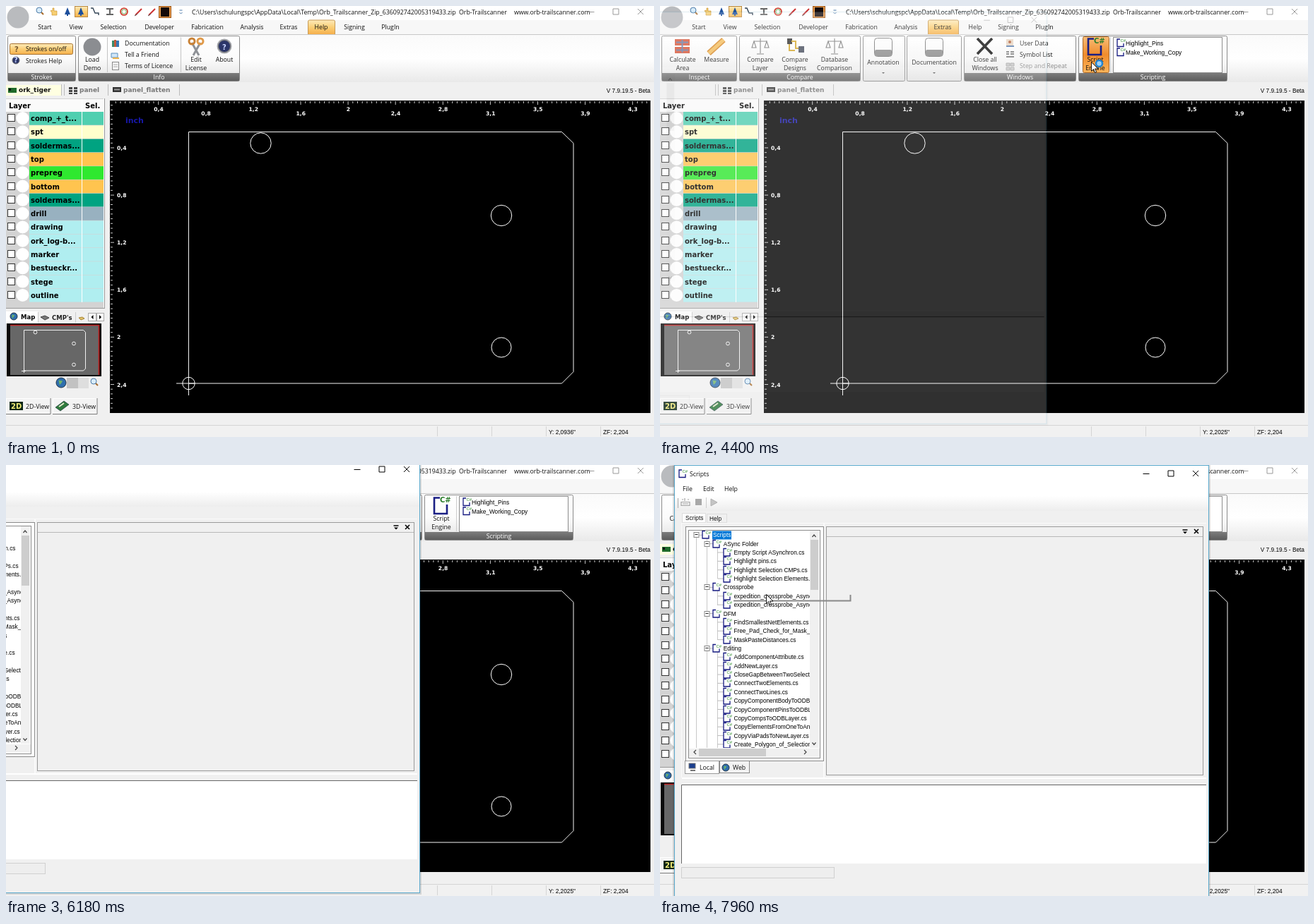
Animation, 917 px wide and 611 px high, one loop 8000 ms. Source, as an HTML page:

```html
<!DOCTYPE html>
<html lang="en">
<head>
<meta charset="utf-8">
<title>Opening the script engine</title>
<style>
html, body { margin: 0; width: 100%; height: 100%; overflow: hidden; background: #f0f0f0; }
svg { display: block; width: 917px; height: 611px; }
text { white-space: pre; }
.ui { font-family: "Open Sans", sans-serif; font-size: 8.75px; }
.sm { font-family: "Liberation Sans", Arial, sans-serif; font-size: 8.3px; }
.vb { font-family: "DejaVu Sans", Verdana, sans-serif; font-weight: bold; font-size: 10px; }
</style>
</head>
<body>
<svg id="stage" viewBox="0 0 917 611" xmlns="http://www.w3.org/2000/svg"></svg>
<script>
const rect = (x, y, w, h, fill, more = '') => `<rect x="${x}" y="${y}" width="${w}" height="${h}" fill="${fill}" ${more}/>`;
const frame = (x, y, w, h, fill, line, more = '') => rect(x + .5, y + .5, w - 1, h - 1, fill, `stroke="${line}" ${more}`);
const disc = (x, y, r, fill, more = '') => `<circle cx="${x}" cy="${y}" r="${r}" fill="${fill}" ${more}/>`;
const path = (d, line, w = 1, fill = 'none') => `<path d="${d}" stroke="${line}" stroke-width="${w}" fill="${fill}"/>`;
const text = (x, y, s, cls = 'ui', fill = '#111', more = '') => `<text x="${x}" y="${y}" class="${cls}" fill="${fill}" ${more}>${s}</text>`;
const mid = (x, y, s, cls, fill) => text(x, y, s, cls, fill, 'text-anchor="middle"');
const group = (id, body) => `<g id="${id}">${body}</g>`;
const ramp = (id, ...stops) => `<linearGradient id="${id}" x2="0" y2="1">` +
  stops.map((c, i) => `<stop offset="${i / (stops.length - 1)}" stop-color="${c}"/>`).join('') + '</linearGradient>';
const range = n => [...Array(n).keys()];

const defs = `<defs>
${ramp('bandFill', '#fafafa', '#ffffff', '#e9e9e9')}${ramp('panelFill', '#ffffff', '#fbfbfb', '#e2e2e2')}
${ramp('footFill', '#7c7c7c', '#5c5c5c')}${ramp('tabFill', '#fdeaba', '#fbcf77', '#f6b04c')}
${ramp('hoverFill', '#fff3cf', '#fbd27c')}${ramp('pressFill', '#f7bd78', '#f08c2c', '#fbb45a')}
${ramp('toolFill', '#ffffff', '#ededed')}
<clipPath id="treeClip"><rect x="26" y="94" width="170" height="308"/></clipPath></defs>`;

const globe = (x, y, r) => disc(x, y, r, '#2f6fae', 'stroke="#234"') + path(`M${x - r / 2} ${y - r / 2}l${r * .8} 1l-2 ${r / 2}l-${r / 3} 2z`, 'none', 0, '#6fb36a');
const lens = (x, y) => path(`M${x + 2} ${y + 2}l4 4`, '#a66a2a', 2) + disc(x, y, 4, '#d8ecfa', 'stroke="#4d7ba8"');
const sheet = (x, y) => path(`M${x + 5} ${y + 1}H${x + 1}V${y + 11.500}H${x + 10}V${y + 7}`, '#151a80', 1.3, '#fff') +
  text(x + 5.500, y + 5, 'C#', 'sm', '#2a8a2a', 'style="font-size:6px"');
const controls = (xs, y, color) => path(`M${xs[0] - 4.5} ${y + .5}h9M${xs[1] - 4} ${y - 4}h8v8h-8zM${xs[2] - 4} ${y - 4}l8 8m0-8l-8 8`, color);

function titleBar() {
  const arrow = x => path(`M${x} 2l4 10h-3v2h-2v-2h-3z`, 'none', 0, '#1d4f9c');
  const pen = x => path(`M${x - 4} 13l9-9`, '#c33', 2) + path(`M${x - 5} 14l4-3`, '#555');
  return rect(0, 0, 917, 20, '#fff') + rect(0, 20, 917, 21, '#f7f7f7') + disc(17, 16, 15.500, '#b9bbbe') +
    lens(47, 6) + path('M65 13v-4l-2-2l1-1l2 1v-4h2v4h4v6z', '#c58b22', .6, '#f7cf73') + arrow(87) +
    frame(97, 0, 19, 16, 'url(#tabFill)', '#b98a45') + arrow(106) + path('M120 3h3l3 7h5v3', '#345', 1.4) +
    path('M142 4h10M142 12h10M147 4v8', '#666', 2) + disc(167, 8, 5, '#fff', 'stroke="#d0392b" stroke-width="1.7"') +
    disc(167, 8, 3.2, 'none', 'stroke="#6fae5c"') + pen(187) + pen(206) +
    frame(216, 0, 18, 17, '#e79a4b', '#9c5a20') + rect(219, 2, 12, 13, '#140a0a') +
    path('M245.500 6h4M245.500 9l2 2l2-2', '#4a78a8') +
    text(263, 11.500, 'C:\\Users\\schulungspc\\AppData\\Local\\Temp\\Orb_Trailscanner_Zip_636092742005319433.zip') +
    text(641, 11.500, 'Orb-Trailscanner') + text(719, 11.500, 'www.orb-trailscanner.com') +
    group('ctlOff', controls([828, 863, 898], 8, '#999')) + group('ctlOn', controls([828, 863, 898], 8, '#000'));
}

function tabs() {
  const names = 'Start 55,View 99,Selection 152,Developer 217,Fabrication 285,Analysis 348,Extras 400,Help 446,Signing 493,PlugIn 544';
  const on = (x, w) => path(`M${x}.5 40V22q0-2 2-2h${w - 4}q2 0 2 2V40`, '#c79a55', 1, 'url(#tabFill)');
  return path('M0 40.500H917', '#c8c8c8') + group('helpTab', on(427, 38)) + group('extrasTab', on(379, 43)) +
    group('extrasHover', path('M379.500 40V22q0-2 2-2h39q2 0 2 2V40', '#d9b04c', 1.3, '#fffdf4')) +
    names.split(',').map(s => { const [n, x] = s.split(' '); return mid(+x, 33, n); }).join('');
}

const box = (x, w, name) => frame(x, 42, w, 65, 'url(#panelFill)', '#8a8a8a', 'rx="2"') +
  (name ? rect(x + 1, 95, w - 2, 11, 'url(#footFill)') + mid(x + w / 2, 103.500, name, 'ui', '#fff') : '');
const label = (x, a, b = '') => mid(x, 79, a) + mid(x, 91, b);

function helpRibbon() {
  const q = (x, y, r) => disc(x, y, r, '#2b3568', 'stroke="#777"') + mid(x, y + r * .55, '?', 'vb', '#c9d4ff');
  return box(2, 97, 'Strokes') + frame(5, 53, 90, 16, 'url(#tabFill)', '#a8722e', 'rx="2"') +
    mid(15, 65, '?', 'vb', '#7a5a30') + text(28, 64, 'Strokes on/off') + q(14, 77, 5) + text(28, 80.500, 'Strokes Help') +
    box(102, 229, 'Info') + disc(122, 58, 12.500, '#8b8d91') + label(122, 'Load', 'Demo') +
    path('M143.500 44V94M247.500 44V94', '#c4c4c4') +
    rect(150, 49, 3, 9, '#3a8a6a') + rect(153, 48, 3, 10, '#c1593a') + rect(156, 49, 4, 9, '#3577b4') +
    path('M149 67h9v6h-9z', '#5b8fbd', 1, '#cfe6f8') + path('M151 74h9', '#e8b04a', 2) +
    frame(150, 79, 10, 12, '#f7f7f7', '#888') + path('M152 83h6M152 86h6', '#aaa') +
    text(168, 55.500, 'Documentation') + text(168, 71.500, 'Tell a Friend') + text(168, 87.500, 'Terms of Licence') +
    path('M263 52l10 18M275 52l-10 18', '#8f9297', 3) + disc(263, 50, 4, 'none', 'stroke="#c98236" stroke-width="3"') +
    disc(275, 50, 4, 'none', 'stroke="#e09a4a" stroke-width="3"') + label(269, 'Edit', 'License') +
    disc(309, 57, 10.500, '#a5a7ad') + q(309, 57, 8.500) + label(309, 'About');
}

function extrasRibbon() {
  const scale = x => path(`M${x} 46V67M${x - 9} 50H${x + 9}M${x - 5} 68h10M${x - 9} 50l-3 9h6zM${x + 9} 50l-3 9h6z`, '#777', 1.1);
  const note = x => frame(x - 13, 45, 26, 27, '#fdfdfd', '#777', 'rx="4"') + rect(x - 12, 62, 24, 9, '#8e8e8e', 'rx="2"') +
    path(`M${x - 2} 94l2 2l2-2z`, 'none', 0, '#555');
  return box(2, 107, 'Inspect') + rect(21, 47, 21, 9, '#d9593c') + rect(21, 58, 21, 9, '#d9593c') +
    path('M23 51.500h17M23 62.500h17M31.500 48v18', '#6a7fa8', 2) + label(32, 'Calculate', 'Area') +
    path('M69 67L90 48', '#d98a2b', 8) + path('M69 67L90 48', '#f4be5e', 5) + label(80, 'Measure') +
    box(112, 172, 'Compare') + scale(142) + label(142, 'Compare', 'Layer') +
    rect(180, 46, 7, 8, '#333') + path('M183 54v9h8M186 50h6v10h8', '#d5a92f', 2) + rect(196, 57, 8, 9, '#4a5160') +
    label(191, 'Compare', 'Designs') + scale(247) + label(247, 'Database', 'Comparison') +
    box(287, 60) + note(316) + mid(316, 83, 'Annotation') + box(349, 78) + note(388) + mid(388, 83, 'Documentation') +
    box(430, 159, 'Windows') + path('M449 46L470 68M470 46L449 68', '#111', 3.6) + label(460, 'Close all', 'Windows') +
    rect(490, 47, 10, 10, '#e8d6c4') + disc(495, 51, 2, '#b3613a') + path('M490 57h11', '#5a7fb0', 2) +
    path('M490 65h4M496 65h5M490 68h4M496 68h5M490 72h11', '#555', 1.6) +
    path('M490 81h5v4h-5zM496 81h5v4h-5zM490 87h5v4h-5zM496 87h5v4h-5z', '#aaa', 1, '#ccc') +
    text(509, 55.500, 'User Data') + text(509, 72, 'Symbol List') + text(509, 88, 'Step and Repeat', 'ui', '#8c8c8c') +
    box(592, 211, 'Scripting') +
    group('hover', frame(598, 43, 38, 52, 'url(#hoverFill)', '#d4ad5c', 'rx="2"')) +
    group('press', frame(598, 43, 38, 52, 'url(#pressFill)', '#a8682c', 'rx="2"')) +
    path('M614 46.500H606V69H624V56', '#1a1f84', 2.6) + text(614, 53, 'C#', 'vb', '#2a7d2a') + label(616, 'Script', 'Engine') +
    path('M637.500 44V94', '#ccc') + frame(641, 44, 155, 51, '#fff', '#8c8c8c') +
    sheet(646, 46) + sheet(646, 59) + text(659, 55.500, 'Highlight_Pins', 'sm', '#000') + text(659, 68.500, 'Make_Working_Copy', 'sm', '#000');
}

function layers() {
  const list = [['comp_+_t...', '#50cfb0'], ['spt', '#ffffcc'], ['soldermas...', '#00a381'], ['top', '#ffc44f'], ['prepreg', '#2fe82f'],
    ['bottom', '#ffc44f'], ['soldermas...', '#00a381'], ['drill', '#98b1c0'],
    ...['drawing', 'ork_log-b...', 'marker', 'bestueckr...', 'stege', 'outline'].map(n => [n, '#b0eef0'])];
  const card = (x, y) => rect(x, y, 12, 7, '#333') + path(`M${x + 2} ${y + 3.500}h8`, '#999', 2);
  return group('firstTab', rect(0, 112, 78, 15, '#ffffe1') + rect(3, 116, 12, 7, '#1f6a2a') + rect(4, 117, 3, 3, '#111') +
      text(18, 122, 'ork_tiger', 'vb', '#111', 'style="font-size:9px"')) +
    path('M78.500 111V127M82.500 111V127M144.500 111V127M245.500 111V127', '#bbb') +
    path('M89 115h5v3h-5zM96 115h5v3h-5zM89 119h5v3h-5zM96 119h5v3h-5zM89 123h5v2h-5zM96 123h5v2h-5z', 'none', 0, '#444') +
    text(104, 122, 'panel', 'vb', '#777', 'style="font-size:9px"') + card(151, 115) +
    text(166, 122, 'panel_flatten', 'vb', '#777', 'style="font-size:9px"') +
    text(912, 122.500, 'V 7.9.19.5 - Beta', 'sm', '#000', 'text-anchor="end"') +
    rect(0, 131, 139, 298, '#d3d3d3') + rect(0, 132, 138, 18, '#fafafa') +
    text(4, 144.500, 'Layer', 'vb', '#000') + text(112, 144.500, 'Sel.', 'vb', '#000') +
    list.map(([name, color], i) => {
      const y = 150 + 19.3 * i;
      return rect(33, y, 105, 18.7, color) + frame(2, Math.round(y + 3), 11, 11, '#fff', '#333') +
        disc(23.500, y + 9, 9, '#fff') + text(35, y + 13, name, 'vb', '#000');
    }).join('') + path('M107.500 132V420M138.500 131V429', '#fff') + path('M139.500 131V429M0 428.500H139', '#999');
}

function mapPane() {
  const button = (x, name) => frame(x, 556, 63, 22, '#f3f3f3', '#fff') + path(`M${x} 578.500H${x + 63}V556`, '#777') + text(x + 28, 570.500, name);
  return rect(0, 433, 45, 17, '#fff') + globe(11, 440, 5) + text(21, 444, 'Map', 'vb', '#000', 'style="font-size:8.5px"') +
    path('M49 441l6-2l6 3l-6 3z', '#444', 1, '#777') + text(65, 444.500, 'CMP\'s', 'vb', '#222', 'style="font-size:8.5px"') +
    path('M45.500 434V449M98.500 434V449', '#ccc') + path('M103 442l5-1l3 2l-5 2z', '#a88434', 1, '#e0c36b') +
    frame(116, 435, 12, 12, '#f8f8f8', '#aaa') + frame(128, 435, 11, 12, '#f8f8f8', '#aaa') +
    path('M123.500 438v6l-3-3zM132 438v6l3-3z', 'none', 0, '#000') +
    rect(1, 450, 134, 75, '#0a0a0a') + rect(6, 452, 126, 71, '#676767') + path('M6 452.500H131.500V523', '#c01818', 1.5) +
    path('M25.500 459.500H109.500l3 3V514l-3 3H25.500zM22 517.500h6M25.500 514v6', '#fff', .9) +
    [[41.500, 462.500], [96, 478.500], [96, 508.500]].map(([x, y]) => disc(x, y, 2.4, 'none', 'stroke="#fff" stroke-width=".9"')).join('') +
    globe(78, 534, 7) + rect(86, 527, 16, 15, '#c2c2c2') + rect(102, 527, 15, 15, '#dedede') + lens(124, 532) +
    button(0, '2D-View') + rect(5, 561, 19, 12, '#0b2616') + text(7, 571, '2D', 'vb', '#f4ec76') +
    button(66, '3D-View') + path('M70 569l12-9l7 5l-12 9z', '#123', .6, '#2e7a3c') + path('M75 568l7-5', '#e8e8d0', 2);
}

function board() {
  const cell = 67.1;
  const across = range(113).map(i => `M${(155.3 + i * cell / 10).toFixed(1)} 135v${i % 10 == 9 ? 5 : 3}`).join('');
  const down = range(65).map(i => `M148 ${(140.600 + i * cell / 10).toFixed(1)}h${i % 10 == 9 ? 5 : 3}`).join('');
  const num = (x, y, s, more = '') => text(x, y, s, 'vb', '#fff', `style="font-size:7.6px" ${more}`);
  return rect(147, 134, 765, 443, '#000') + path(across + down, '#ddd', .9) +
    '0,4 0,8 1,2 1,6 2 2,4 2,8 3,1 3,5 3,9 4,3'.split(' ').map((s, i) => num(216 + i * cell, i % 2 ? 154.500 : 148.500, s, 'text-anchor="middle"')).join('') +
    '0,4 0,8 1,2 1,6 2 2,4'.split(' ').map((s, i) => num(157, 204 + i * cell, s)).join('') +
    text(169, 165.500, 'inch', 'vb', '#1717a8', 'style="font-size:11px"') +
    path('M258.500 178.500H786.500L803 194.500V518.500L786.500 535H258.500zM241 535H267M258.500 526V552', '#f4f4f4') +
    [[360.500, 194.500, 14.700], [701, 297, 14.700], [701, 484, 14], [258.500, 535, 8.700]].map(([x, y, r]) => disc(x, y, r, 'none', 'stroke="#fff"')).join('');
}

const status = rect(0, 594, 917, 17, '#f1f1f1') + path('M0 594.500H917M610.500 596V610M687.500 596V610M764.500 596V610M841.500 596V610', '#d5d5d5') +
  text(768, 606.500, '', 'sm', '#000', 'id="posY"') + text(845, 606.500, 'ZF: 2,204', 'sm', '#000');

const scripts = `Scripts
-ASync Folder
--Empty Script ASynchron.cs
--Highlight pins.cs
--Highlight Selection CMPs.cs
--Highlight Selection Elements.cs
-Crossprobe
--expedition_crossprobe_Async.cs
--expedition_crossprobe_Async2.cs
-DFM
--FindSmallestNetElements.cs
--Free_Pad_Check_for_Mask_Layer.cs
--MaskPasteDistances.cs
-Editing
--AddComponentAttribute.cs
--AddNewLayer.cs
--CloseGapBetweenTwoSelected.cs
--ConnectTwoElements.cs
--ConnectTwoLines.cs
--CopyComponentBodyToODBLayer.cs
--CopyComponentPinsToODBLayer.cs
--CopyCompsToODBLayer.cs
--CopyElementsFromOneToAnother.cs
--CopyViaPadsToNewLayer.cs
--Create_Polygon_of_Selection.cs`.split('\n');

function tree() {
  const rows = scripts.map((line, i) => {
    const depth = line.lastIndexOf('-', 1) + 1, y = 100.300 + i * 12.36, x = 35.500 + depth * 15;
    const node = depth < 2 ? frame(x - 4, Math.round(y) - 4, 8, 8, '#fff', '#888') + path(`M${x - 2} ${Math.round(y) - .5}h4`, '#222') : '';
    return path(`M${x} ${y}h9`, '#aaa', .8) + node + sheet(x + 7.500, Math.round(y) - 6.500) +
      text(59 + depth * 14.700, y + 3, line.slice(depth), 'sm', '#000', i ? '' : 'id="rootName"');
  });
  return `<g clip-path="url(#treeClip)">` + path('M35.500 104V402M50.500 105V402M65.500 117V162M65.500 179V200M65.500 216V249M65.500 265V402', '#bbb', .8) +
    rect(58, 94.500, 27, 12, '#0078d7', 'id="rootMark"') + rows.join('') + '</g>';
}

function scriptWindow() {
  return rect(2, 0, 761, 616, '#000', 'opacity=".12"') + frame(4, 1, 757, 613, '#f0f0f0', '#58a8cc') +
    rect(5, 2, 755, 43, '#fff') + rect(5, 45, 755, 21, 'url(#toolFill)') +
    sheet(10, 7) + text(26, 17, 'Scripts') + controls([672, 707, 742], 13, '#000') +
    text(16, 38, 'File') + text(45, 38, 'Edit') + text(75, 38, 'Help') +
    path('M9.500 48V62', '#bbb', 1.5) + path('M14 53.500h12v5h-12zM16 56h8M15 50h2M19 48v4M23 50h2', '#a4a4a4', 1.2) + rect(34, 49, 9, 9, '#a8a8a8') +
    path('M49.500 47V62', '#ccc') + path('M56 49l9 5l-9 5z', '#b0b0b0', 1, '#c4c4c4') +
    rect(14, 83, 743, 361, '#fafafa') + rect(15, 444, 742, 2, '#fff') +
    rect(14, 454, 743, 112, '#fff') + path('M14.500 566V454.500H757', '#666') + frame(14, 571, 217, 16, '#eeeeee', '#d0d0d0') +
    group('content',
      frame(50, 70, 29, 13, '#f0f0f0', '#ddd') + frame(15, 69, 34, 14, '#fcfcfc', '#ddd') + frame(16, 70, 32, 12, 'none', '#555', 'id="tabFocus"') +
      text(20, 79, 'Scripts', 'sm') + text(54, 80, 'Help', 'sm') +
      rect(15, 84, 200, 360, '#f0f0f0') + frame(20, 88, 196, 333, '#fff', '#8a8a8a') + frame(24, 93, 187, 324, '#fff', '#8a8a8a') + tree() +
      rect(25, 403, 185, 12, '#f0f0f0') + rect(39, 403, 95, 11, '#cdcdcd') + path('M35 405l-3 3l3 3M188 405l3 3l-3 3', '#444', 1.2) +
      frame(19, 420, 49, 19, '#fff', '#999') + rect(25, 424, 9, 7, '#1b3f8f', 'stroke="#777"') + path('M27 434h7', '#777', 2) + text(40, 433, 'Local') +
      frame(68, 420, 43, 18, '#f2f2f2', '#888') + globe(77, 430, 5) + text(87, 433, 'Web') +
      rect(217, 84, 543, 360, '#f0f0f0') + frame(219, 88, 534, 353, '#f0f0f0', '#9a9a9a') + path('M220 102.500H752', '#b8b8b8') +
      path('M723.500 93h7', '#000', 1.5) + path('M724 95.500h6l-3 3z', 'none', 0, '#000') + path('M740 92l6 6m0-6l-6 6', '#000', 1.6)) +
    rect(196, 94, 13, 308, '#f0f0f0') + rect(197, 107, 11, 71, '#cdcdcd') +
    path('M199.500 103l2.500-3l2.500 3M199.500 394.500l2.500 3l2.500-3', '#444', 1.2);
}

const pointer = path('M0 0V13l3-3l2 5l2.200-1l-2.200-4.500h4.500z', '#000', .9, '#fff') +
  group('busy', disc(11, 2, 4.500, '#9fd0f5', 'stroke="#2484d0" stroke-width="2.6"'));

stage.innerHTML = defs + rect(0, 0, 917, 611, '#f0f0f0') + titleBar() + rect(0, 41, 917, 67, 'url(#bandFill)') + tabs() +
  group('helpRibbon', helpRibbon()) + group('extrasRibbon', extrasRibbon()) + layers() + mapPane() + board() + status +
  group('win', scriptWindow()) + group('tip', path('M104 192.500H269.500V184', '#8a8a8a', 2)) + group('cursor', pointer);

const $ = id => document.getElementById(id);
const show = (id, on) => $(id).style.display = on ? '' : 'none';
const clamp = v => Math.max(0, Math.min(1, v));
const mix = (a, b, p) => a.map((v, i) => v + (b[i] - v) * p);
// Progress in n held steps; the last one lands at b.
const steps = (t, a, b, n) => t < a ? 0 : clamp(Math.floor((t - a) / (b - a) * (n - 1) + 1.001) / n);
const smooth = p => p * p * (3 - 2 * p);

function windowAt(t) {
  if (t < 6180) return [-196, -7];
  if (t < 6710) return mix([-175, -7], [0, 0], Math.floor((t - 6180) / 75.700) / 7);
  return t < 6810 ? [0, 0] : [16, -1];
}

function cursorAt(t) {
  if (t < 670) return null;
  if (t < 1530) return mix([842, 622], [436, 42], 1 - (1 - steps(t, 670, 1460, 11)) ** 1.6);
  if (t < 1610) return [427, 38];
  if (t < 1750) return [419, 35];
  if (t < 4400) return mix([420, 35], [610, 78], smooth(steps(t, 2390, 3150, 11)));
  if (t < 5260) return mix([610, 79], [350, 40], smooth(clamp((steps(t, 4400, 5190, 11) - .3) / .7)));
  if (t < 5350) return [224, 35];
  if (t < 5450) return [96, 30];
  if (t < 6180) return null;
  const [x, y] = windowAt(t);
  return mix([x + 120, y + 21], [150, 183], smooth(steps(t, 7440, 7960, 8)));
}

function height(t, at) {
  if (!at || t < 1460 && at[1] > 577) return '2,0936';
  if (t >= 1460 || at[1] < 167) return '2,2025';
  return ((535 - at[1]) / 167.500).toFixed(4).replace('.', ',');
}

function draw(t) {
  const at = cursorAt(t), extras = t >= 1920, active = extras && t < 4400;
  const over = extras && t < 5200 && at && at[0] > 598 && at[1] > 43;
  show('ctlOn', active); show('ctlOff', !active);
  show('helpTab', !extras); show('helpRibbon', !extras);
  show('extrasTab', extras); show('extrasRibbon', extras);
  show('extrasHover', t >= 1530 && !extras);
  show('hover', over && t < 3240); show('press', over && t >= 3240);
  show('firstTab', t < 4400 || t >= 6180);
  $('posY').textContent = `Y: ${t < 1460 ? height(t, at) : '2,2025'}"`;

  const fade = clamp(.2 + .4 * Math.floor((t - 4400) / 80));
  const [x, y] = windowAt(t), size = 1 - .058 * (1 - fade);
  show('win', t >= 4400);
  $('win').setAttribute('opacity', fade);
  $('win').setAttribute('transform', `translate(${x + 382.500} ${y + 308}) scale(${size}) translate(-382.500 -308)`);
  show('content', t >= 4640);
  const picked = t >= 7440;
  show('tabFocus', !picked); show('rootMark', picked);
  $('rootName').setAttribute('fill', picked ? '#fff' : '#000');
  show('tip', t >= 7960);

  show('cursor', at); show('busy', t >= 4400 && t < 4720);
  if (at) $('cursor').setAttribute('transform', `translate(${at.map(v => Math.round(v) + .5)})`);
}

const start = performance.now();
function tick() {
  draw((performance.now() - start) % 8000);
  requestAnimationFrame(tick);
}
tick();
</script>
</body>
</html>
```
